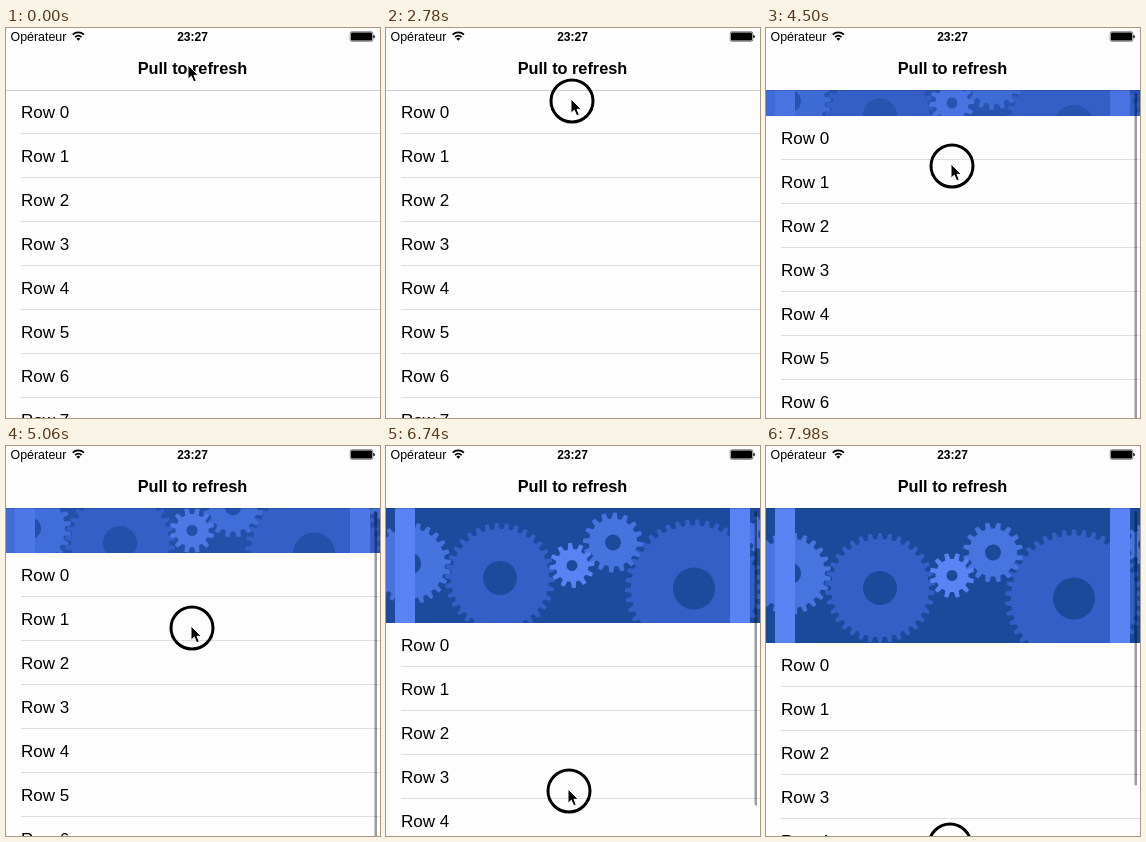
An HTML page for the animation above (8000 ms loop, 374 px wide and 390 px high).

```html
<!DOCTYPE html>
<html lang="fr">
<head>
<meta charset="utf-8">
<title>Pull to refresh</title>
<style>
  html, body { margin: 0; width: 100%; height: 100%; overflow: hidden; background: #fdfdfd; }
  svg { display: block; width: 374px; height: 390px; }
  text { font-family: "Liberation Sans", Arial, sans-serif; fill: #000; }
  .row { font-size: 17px; }
  .title { font-size: 16.3px; font-weight: bold; text-anchor: middle; }
  .carrier { font-size: 12.4px; }
  .clock { font-size: 12px; font-weight: bold; text-anchor: middle; }
  .paper { fill: #fdfdfd; }
</style>
</head>
<body>
<svg viewBox="0 0 374 390">
  <rect y="62" width="374" height="328" fill="#1c4a9b"/>
  <g id="scene">
    <g id="gears"></g>
    <path d="M9-200h20v400h-20zM344-200h20v400h-20z" fill="#5a84f4"/>
  </g>
  <rect id="tint" y="62" width="374" height="328" fill="#345fc6"/>
  <g id="table"><rect class="paper" width="374" height="480"/></g>
  <rect id="bar" x="368.5" y="65" width="2.5" rx="1.25" fill="#000" fill-opacity=".38"/>

  <rect class="paper" width="374" height="62"/>
  <rect y="62" width="374" height="1" fill="#202040" fill-opacity=".22"/>
  <text class="carrier" x="4.5" y="12.6">Opérateur</text>
  <g fill="none" stroke="#000" stroke-width="1.8">
    <path d="M66.7 6.6a8.2 8.2 0 0 1 11.2 0M69 9.1a5 5 0 0 1 6.6 0"/>
    <path d="M72.3 12.8l-2-2.1a2.9 2.9 0 0 1 4 0z" fill="#000" stroke="none"/>
  </g>
  <text class="clock" x="186.5" y="12.5">23:27</text>
  <rect x="344.25" y="3.75" width="22.5" height="9.5" rx="1.5" fill="none" stroke="#000" stroke-width=".5"/>
  <rect x="345" y="4.5" width="21" height="8" rx="1"/>
  <path d="M367.3 6.7q1.6 .4 1.6 1.8t-1.6 1.8z"/>
  <text class="title" x="186.5" y="46">Pull to refresh</text>

  <g id="pointer">
    <circle id="ring" r="21" fill="none" stroke="#000" stroke-width="3"/>
    <path transform="translate(-1 -2)" d="M0 0V14.2L3.3 11.2L5.7 16.8L8.3 15.7L6 10.3H10.3Z"
          stroke="#fff" stroke-width="1" stroke-linejoin="round"/>
  </g>
</svg>
<script>
const LOOP = 8000, TOP = 62, ROW = 44;
const $ = id => document.getElementById(id);

function add(parent, tag, attrs, text) {
  const el = document.createElementNS('http://www.w3.org/2000/svg', tag);
  for (const key in attrs) el.setAttribute(key, attrs[key]);
  if (text) el.textContent = text;
  return parent.appendChild(el);
}

// Toothed wheel with a round hole
function gearPath(r, depth, teeth, hole) {
  const step = 2 * Math.PI / teeth, pts = [];
  const put = (radius, a) =>
    pts.push((radius * Math.cos(a)).toFixed(2) + ' ' + (radius * Math.sin(a)).toFixed(2));
  for (let i = 0; i < teeth; i++) {
    const a = i * step;
    put(r - depth, a - step * .3);
    put(r, a - step * .17);
    put(r, a + step * .17);
    put(r - depth, a + step * .3);
  }
  return `M${pts.join('L')}ZM${hole} 0A${hole} ${hole} 0 1 0 ${-hole} 0A${hole} ${hole} 0 1 0 ${hole} 0Z`;
}

// x, y from the scene's middle, radius, tooth depth, teeth, hole, direction, colour
const gears = [
  [24, -2, 41, 6, 24, 11, 1, '#4774de'],
  [378, -31, 20, 5, 12, 6, -1, '#4774de'],
  [114, 12.5, 55, 6, 34, 17, -1, '#345fc6'],
  [308, 23, 69, 6, 42, 21, 1, '#345fc6'],
  [227, -23, 30, 6, 16, 8, -1, '#4774de'],
  [186, 0, 22.5, 6, 12, 5.5, 1, '#5a84f4']
].map(([x, y, r, depth, teeth, hole, dir, fill]) => ({
  x, y, speed: dir * 12 / teeth,
  el: add($('gears'), 'path', { d: gearPath(r, depth, teeth, hole), fill, 'fill-rule': 'evenodd' })
}));

for (let i = 0; i < 9; i++) {
  add($('table'), 'text', { class: 'row', x: 15, y: i * ROW + 28 }, 'Row ' + i);
  add($('table'), 'rect', { x: 15, y: i * ROW + 43, width: 359, height: 1, fill: '#dcdce4' });
}

// Smooth monotone curve through [position, value] points
function curve(points) {
  const slope = i => (points[i + 1][1] - points[i][1]) / (points[i + 1][0] - points[i][0]);
  const last = points.length - 1;
  const tangent = points.map((p, i) => {
    if (i === 0 || i === last) return i ? slope(last - 1) : 0;
    const a = slope(i - 1), b = slope(i);
    return a * b > 0 ? 2 * a * b / (a + b) : 0;
  });
  return v => {
    if (v <= points[0][0]) return points[0][1];
    if (v >= points[last][0]) return points[last][1];
    let i = 0;
    while (v > points[i + 1][0]) i++;
    const [p, a] = points[i], [q, b] = points[i + 1];
    const w = q - p, u = (v - p) / w, u2 = u * u, u3 = u2 * u;
    return a + (b - a) * (3 * u2 - 2 * u3)
      + w * (tangent[i] * (u3 - 2 * u2 + u) + tangent[i + 1] * (u3 - u2));
  };
}

const handX = curve([[22, 183], [35, 184], [40, 186], [109, 186], [125, 184], [145, 183], [171, 184]]);
const handY = curve([[22, 39], [35, 64], [40, 70], [46, 73], [77, 73], [85, 99],
  [109, 182], [125, 259], [145, 345], [171, 399]]);
// Rubber-band pull for a finger height
const pullAt = curve([[87, 0], [99, 7], [182, 45], [259, 81], [345, 115], [399, 135]]);

// Three ticks per 140 ms, starting at 0, 20 and 120
function tickAt(t) {
  const phase = t % 140;
  return 3 * Math.floor(t / 140) + (phase < 20 ? 0 : phase < 120 ? 1 : 2);
}

const move = (el, x, y, turn = 0) =>
  el.setAttribute('transform', `translate(${x.toFixed(2)} ${y.toFixed(2)}) rotate(${turn.toFixed(2)})`);

function draw(t) {
  const tick = tickAt(t), y = handY(tick), pull = Math.round(pullAt(y));
  move($('pointer'), Math.round(handX(tick)), Math.round(y));
  $('ring').setAttribute('opacity', tick < 12 ? 0 : tick < 13 ? .5 : 1);
  move($('table'), 0, TOP + pull);
  move($('scene'), 0, TOP + pull / 2);
  for (const g of gears) move(g.el, g.x, g.y, g.speed * pull);
  $('tint').setAttribute('opacity', (.7 * Math.pow(1 - pull / 140, 2)).toFixed(3));
  $('bar').setAttribute('height', 409.5 - pull);
  $('bar').setAttribute('opacity', Math.min(1, pull / 4));
}

function loop(now) {
  draw(now % LOOP);
  requestAnimationFrame(loop);
}
draw(0);
requestAnimationFrame(loop);
</script>
</body>
</html>
```
